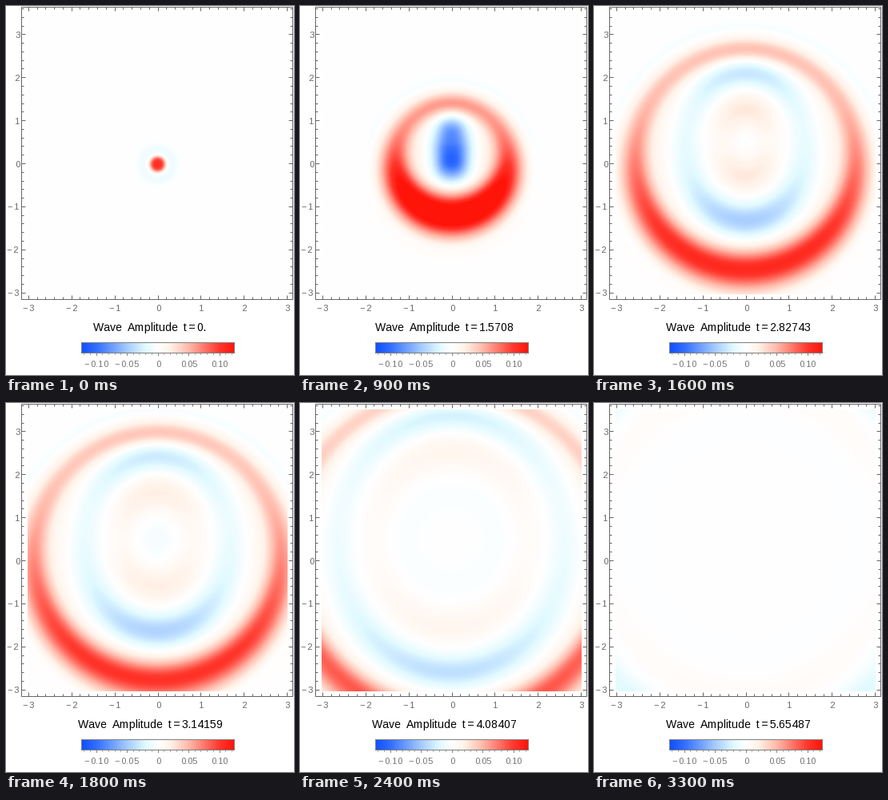
Write a matplotlib script that moves like this. It is 360 px wide and 462 px high and loops after 3400 ms.

```python
import numpy as np
import matplotlib.pyplot as plt
from matplotlib.animation import FuncAnimation
from matplotlib.colors import LinearSegmentedColormap, Normalize

W, H, DPI = 360, 462, 100
PX = 72 / DPI                       # points per pixel
X0, Y0, UNIT = 190, 197.5, 53.9     # plot origin and scale in pixels
LIMIT = 0.124
GRAY = "0.4"

plt.rcParams.update({
    "font.family": "Liberation Sans",
    "mathtext.fontset": "custom",
    "mathtext.rm": "Liberation Sans",
    "text.hinting_factor": 1,       # whole-pixel letter advances
})

STOPS = [
    (-0.124, (16, 80, 255)), (-0.10, (50, 110, 255)), (-0.05, (165, 203, 255)),
    (-0.02, (225, 250, 255)), (0, (255, 255, 255)), (0.02, (255, 242, 232)),
    (0.05, (255, 185, 170)), (0.10, (255, 55, 45)), (0.124, (255, 20, 10)),
]
cmap = LinearSegmentedColormap.from_list(
    "wave",
    [((v + LIMIT) / (2 * LIMIT), tuple(c / 255 for c in rgb)) for v, rgb in STOPS],
    N=512)
norm = Normalize(-LIMIT, LIMIT, clip=True)

# Tenths of a second at which each step of 0.1 pi begins
STARTS = [0, 1, 3, 5, 7, 9, 11, 12, 14, 16, 18, 20, 22, 24, 25, 27, 29, 31, 33]

gx, gy = np.meshgrid(np.linspace(-3, 3, 325), np.linspace(3.5, -3, 353))


def polar(cy):
    """Distance from (0, cy) and softened sine of the direction."""
    dy = gy - cy
    rho = np.hypot(gx, dy)
    return rho, dy / np.hypot(rho, 0.25)


def ring(rho, radius, gain, inner, outer):
    """Spreading ring with separate half widths inside and outside its crest."""
    s = rho - radius
    width = np.where(s < 0, inner, outer)
    return gain / np.sqrt(np.maximum(radius, 0.35)) * np.exp2(-(s / width) ** 2)


def field(t):
    onset = 1 - np.exp(-(t / 0.25)**2)
    fade = np.exp(-(t / 6)**4)
    # leading crest, strongest towards the bottom
    rho, d = polar(0)
    u = onset * ring(rho, t - 0.28 + 0.12 * d,
                     0.115 - 0.085 * d + 0.008 * d**2 + 0.037 * d**3,
                     0.27 - 0.05 * d + 0.03 * (1 - d)**2 / max(t, 1),
                     0.31 - 0.1 * d)
    u += 0.105 * np.exp(-(rho / 0.185)**4 - (t / 0.4)**2)
    # faint ripple ahead of the front
    u -= 0.005 * (1 + np.exp(-t / 0.2)) * np.exp(-((rho - t - 0.36) / 0.12)**2)
    # soft inner shoulder on the flanks
    rho, d = polar(0.3)
    u += ring(rho, t - 0.8, 0.010 * (1 - d**2)**2, 0.28, 0.28)
    # trough
    rho, d = polar(0.4)
    width = 0.28 - 0.03 * d
    u -= ring(rho, t - 1.45 + 0.33 * d**2,
              0.018 - 0.01 * d + 0.036 * np.abs(d)**3, width, width)
    u -= 0.08 * np.exp(-(rho / 0.4)**2 - ((t - 1.45) / 0.3)**2)
    # trailing ripples
    rho, d = polar(0.5)
    u += fade * ring(rho, t - 2.3 + 0.25 * d**2, 0.007 + 0.018 * d**2, 0.32, 0.32)
    u -= fade * ring(rho, t - 3.05, 0.004, 0.3, 0.3)
    return u


fig = plt.figure(figsize=(W / DPI, H / DPI), dpi=DPI, facecolor="white")
ax = fig.add_axes([0, 0, 1, 1])


def number(v, digits=0):
    text = f"{abs(v):.{digits}f}" if v else "0"
    return rf"${{-}}\:{text}$" if v < 0 else text


def label(x, y, text, size=11, ha="center", color=GRAY):
    return ax.text(x, y, text, fontsize=size * PX, ha=ha, va="baseline", color=color)


def mid(v):
    """Centre of the pixel that holds v, for crisp lines."""
    return np.floor(v) + 0.5


def vticks(xs, y, length, color=GRAY):
    ax.vlines(mid(xs), y, y + length, colors=color, lw=PX, snap=False)


def hticks(ys, x, length):
    ax.hlines(mid(ys), x, x + length, colors=GRAY, lw=PX, snap=False)


def box(left, top, right, bottom, color=GRAY):
    ax.add_patch(plt.Rectangle((left, top), right - left, bottom - top,
                               fill=False, ec=color, lw=PX, snap=False, zorder=3))


image = ax.imshow(field(0), cmap=cmap, norm=norm, aspect="auto",
                  extent=(27, 352, 361, 8))

# Plot frame
L, R, T, B = 19.5, 358.5, 1.5, 367.5
box(L, T, R, B)
major = np.arange(-3, 4)
for ticks_x, ticks_y, size in (
        (major, major, 5),
        (np.arange(-15, 16) / 5, np.arange(-15, 19) / 5, 3)):
    px, py = X0 + ticks_x * UNIT, Y0 - ticks_y * UNIT
    vticks(px, B, -size)
    vticks(px, T, size)
    hticks(py, L, size)
    hticks(py, R, -size)
for v in major:
    label(X0 + v * UNIT, 382, number(v))
    label(17.3, Y0 - v * UNIT + 4, number(v), ha="right")

# Legend
ramp = np.linspace(-LIMIT, LIMIT, 192)[None, :]
ax.imshow(ramp, cmap=cmap, norm=norm, aspect="auto", extent=(94, 286, 435, 421))
box(94.5, 421.5, 285.5, 434.5, "0.5")
SCALE = 770
vticks(190 + np.arange(-12, 13) * 0.01 * SCALE, 435, 2, "0.65")
for v in (-0.10, -0.05, 0, 0.05, 0.10):
    vticks(np.array([190 + v * SCALE]), 435, 3, "0.5")
    label(190 + v * SCALE, 452, number(v, 2), color="0.45")

title = label(180, 407, "", 14, color="black")
ax.set_xlim(0, W)
ax.set_ylim(H, 0)
ax.axis("off")


def update(i):
    step = np.searchsorted(STARTS, i, side="right") - 1
    t = step * np.pi / 10
    image.set_data(field(t))
    value = f"{t:.6g}" if step else "0."
    title.set_text(rf"Wave  Amplitude  t$\,$=$\,${value}")
    return image, title


anim = FuncAnimation(fig, update, frames=34, interval=100, repeat=True, repeat_delay=0)
plt.show()
```
